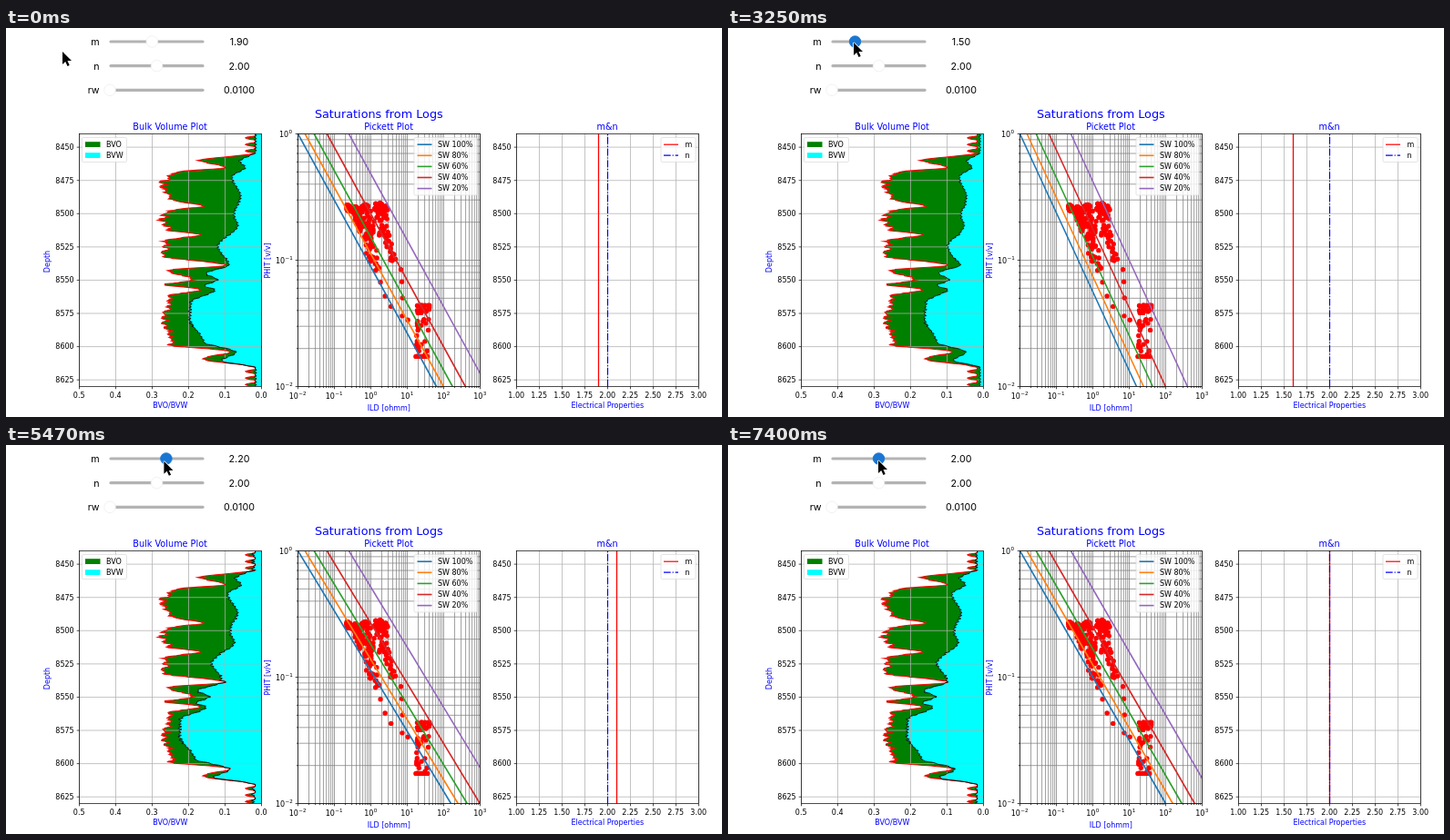
An HTML page with a canvas for the animation above (8000 ms loop, 786 px wide and 428 px high).

```html
<!DOCTYPE html>
<html lang="en">
<head>
<meta charset="utf-8">
<title>Saturations from Logs</title>
<style>
html, body { margin: 0; width: 100%; height: 100%; overflow: hidden; background: #fff; }
canvas { display: block; }
</style>
</head>
<body>
<canvas id="stage" width="786" height="428"></canvas>
<script>
const c = document.getElementById('stage').getContext('2d');
const LOOP = 8000, TICK = 147.6;
const TOP = 116.5, BOTTOM = 394.5, WIDE = 200;
const BULK = 80.5, PICKETT = 320.5, PROPS = 560.5;
const UI = 'Inter, "Open Sans", sans-serif', PLOT = '"DejaVu Sans", sans-serif';
const RW = 0.01, N = 2, M0 = 1.9;

// Cursor path: [tick, x, y]
const cursorPath = [[0, 62, 26], [2, 59, 25], [4, 59, 25], [6, 66, 30], [10, 158, 12.5], [13, 158, 12.5],
  [18, 141, 15.5], [20, 138, 16], [22, 138, 16], [23, 141, 16], [26, 150, 17], [32, 174.5, 18],
  [36, 174.5, 18], [41, 169, 17], [46, 169, 17], [47, 165, 17]];

// Key points down the well, [y, volume]: porosity of the sands, water volume at m = M0
const sand = [[137, 0.01], [146, 0.17], [153, 0.1], [160, 0.25], [172, 0.27], [188, 0.25], [196, 0.165],
  [202, 0.262], [210, 0.272], [222, 0.252], [228, 0.165], [233, 0.26], [251, 0.265], [261, 0.1],
  [267, 0.26], [277, 0.185], [282, 0.26], [288, 0.165], [294, 0.25], [321, 0.265], [349, 0.245],
  [356, 0.085], [364, 0.16], [374, 0.01]];
const water = [[136, 0.0165], [147, 0.06], [153, 0.045], [164, 0.081], [185, 0.058], [206, 0.076],
  [217, 0.065], [240, 0.12], [261, 0.09], [270, 0.153], [277, 0.122], [284, 0.156], [288, 0.128],
  [302, 0.195], [320, 0.197], [345, 0.16], [357, 0.07], [366, 0.11], [374, 0.0165]];

const linear = u => u, smooth = u => u * u * (3 - 2 * u);

function between(keys, t, i = 1, ease = linear) {
  const n = keys.findIndex(k => k[0] > t);
  if (n < 1) return keys[n ? keys.length - 1 : 0][i];
  const a = keys[n - 1], b = keys[n];
  return a[i] + (b[i] - a[i]) * ease((t - a[0]) / (b[0] - a[0]));
}

let seed = 7;
const rand = () => (seed = seed * 16807 % 2147483647) / 2147483647;

// One sample per half foot; resistivity follows from Archie's equation
const samples = [];
for (let y = TOP; y <= BOTTOM; y += 0.73) {
  const shale = Math.max(0.0173, 0.026 + 0.018 * Math.cos((y - 121) * 0.88));
  const ripple = 1 + 0.025 * Math.sin(y * 1.05) + 0.06 * (rand() - 0.5);
  const phi = Math.max(shale, between(sand, y, 1, smooth) * ripple);
  const w = between(water, y, 1, smooth) * (1 + 0.03 * (rand() - 0.5)) + 0.003 * Math.sin(y * 1.9);
  samples.push({ y, phi, rt: RW * phi ** (N - M0) / w ** N });
}

// The thumb snaps to tenths under the cursor once the drag has begun
function sliderAt(tick) {
  if (tick < 10) return 1.9;
  return Math.round(20 + (between(cursorPath, tick) + 1.3 - 165.5) / 5.2) / 10;
}

// Plots redraw one slider change at a time, with a delay and a least gap
const redraws = [{ at: 0, m: 1.9 }];
for (let tick = 1; tick * TICK < LOOP; tick++) {
  const last = redraws[redraws.length - 1], m = sliderAt(tick);
  if (m !== last.m) redraws.push({ at: Math.max(tick + 2.5, last.at + 2.2), m });
}

function text(s, x, y, { size = 8, color = '#000', align = 'center', font = PLOT, turn = 0 } = {}) {
  c.save();
  c.translate(x, y);
  c.rotate(turn);
  c.font = size + 'px ' + font;
  c.fillStyle = color;
  c.textAlign = align;
  c.fillText(s, 0, size * 0.36);
  c.restore();
}

function path(points, color, width = 1, fill) {
  c.beginPath();
  points.forEach(p => c.lineTo(p[0], p[1]));
  if (color) { c.strokeStyle = color; c.lineWidth = width; c.stroke(); }
  if (fill) { c.fillStyle = fill; c.fill(); }
}
const line = (x1, y1, x2, y2, color, width) => path([[x1, y1], [x2, y2]], color, width);

function dashed(x1, y1, x2, y2) {
  c.setLineDash([7.7, 1.9, 1.2, 1.9]);
  line(x1, y1, x2, y2, '#00f', 1.2);
  c.setLineDash([]);
}

function disc(x, y, r, fill, edge) {
  c.beginPath();
  c.arc(x, y, r, 0, 7);
  c.fillStyle = fill;
  c.fill();
  if (edge) { c.strokeStyle = edge; c.lineWidth = 0.8; c.stroke(); }
}

function box(x, y, w, h) {
  c.beginPath();
  c.roundRect(x, y, w, h, 1.6);
  c.fillStyle = 'rgba(255,255,255,.8)';
  c.fill();
  c.strokeStyle = '#d8d8d8';
  c.lineWidth = 0.7;
  c.stroke();
}

function clipped(x, draw) {
  c.save();
  c.beginPath();
  c.rect(x, TOP, WIDE, BOTTOM - TOP);
  c.clip();
  draw();
  c.restore();
}

function frame(x, title, label, labelY) {
  c.strokeStyle = '#000';
  c.lineWidth = 0.7;
  c.strokeRect(x, TOP, WIDE, BOTTOM - TOP);
  text(title, x + 99.6, 108.6, { size: 9.7, color: '#00f' });
  text(label, x + 99.8, labelY, { color: '#00f' });
}

function gridX(x, color, tick = 2.8) {
  line(x, TOP, x, BOTTOM, color, 0.75);
  line(x, BOTTOM, x, BOTTOM + tick, '#000', 0.7);
}

function gridY(x, y, color, tick = 2.8) {
  line(x, y, x + WIDE, y, color, 0.75);
  line(x - tick, y, x, y, '#000', 0.7);
}

function linearGrid(x, count, label) {
  for (let i = 0; i <= count; i++) {
    const gx = x + i * WIDE / count;
    gridX(gx, '#b0b0b0');
    text(label(i), gx - 0.3, 404);
  }
  for (let depth = 8450; depth <= 8625; depth += 25) {
    const y = TOP + (depth - 8440) * (BOTTOM - TOP) / 190;
    gridY(x, y, '#b0b0b0');
    text(depth, x - 5.8, y, { align: 'right' });
  }
}

function slider(name, y, x, value, active) {
  text(name, 102.6, y, { size: 10.7, align: 'right', font: UI });
  c.lineCap = 'round';
  line(115, y, 216, y, '#b3b3b3', 3.2);
  c.lineCap = 'butt';
  disc(x, y, 6.3, active ? '#1976d2' : '#fff', active ? '#1976d2' : '#eee');
  text(value, 256, y, { size: 10.7, font: UI });
}

function bulkPlot(m) {
  const right = BULK + WIDE;
  const phi = samples.map(s => [right - 400 * s.phi, s.y]);
  const bvw = samples.map(s => {
    const sw = Math.sqrt(RW / (s.phi ** m * s.rt));
    return [right - 400 * s.phi * Math.min(1, sw), s.y];
  });
  clipped(BULK, () => {
    path([...phi, ...bvw.slice().reverse()], null, 0, '#008000');
    path([...bvw, [right, BOTTOM], [right, TOP]], null, 0, '#0ff');
  });
  linearGrid(BULK, 5, i => ((5 - i) / 10).toFixed(1));
  clipped(BULK, () => {
    path(phi, '#f00', 1.1);
    path(bvw, '#000', 0.9);
  });
  frame(BULK, 'Bulk Volume Plot', 'BVO/BVW', 415.5);
  text('Depth', 45, 257, { color: '#00f', turn: -Math.PI / 2 });
  box(83.5, 120.5, 49, 27);
  [['BVO', '#008000'], ['BVW', '#0ff']].forEach(([s, color], i) => {
    c.fillStyle = color;
    c.fillRect(87, 125.2 + i * 12, 16.5, 5.8);
    text(s, 110, 128.2 + i * 12, { align: 'left' });
  });
}

function power(x, y, e) {
  text('10', x, y, { align: 'left' });
  text(String(e).replace('-', '\u2212'), x + 10.6, y - 3.4, { size: 5.6, align: 'left' });
}

function pickettPlot(m) {
  const px = v => PICKETT + (v + 2) * 40, py = v => TOP - v * 139;
  for (let e = -2; e <= 3; e++)
    for (let k = 1; k < 10; k++) {
      const v = e + Math.log10(k), tick = k > 1 ? 1.6 : 2.8;
      if (v <= 3) gridX(px(v), '#808080', tick);
      if (v <= 0) gridY(PICKETT, py(v), '#808080', tick);
      if (k > 1) continue;
      power(px(e) - (e < 0 ? 9.8 : 7.3), 405, e);
      if (e <= 0) power(e < 0 ? 296 : 300, py(e) + 1, e);
    }
  const lines = [[100, '#1f77b4'], [80, '#ff7f0e'], [60, '#2ca02c'], [40, '#d62728'], [20, '#9467bd']];
  clipped(PICKETT, () => {
    samples.forEach(s => disc(px(Math.log10(s.rt)), py(Math.log10(s.phi)), 2.7, '#f00'));
    for (const [sw, color] of lines) {
      const start = -2 - N * Math.log10(sw / 100);
      line(px(start), TOP, px(start + 2 * m), BOTTOM, color, 1.6);
    }
  });
  frame(PICKETT, 'Pickett Plot', 'ILD [ohmm]', 418);
  text('PHIT [v/v]', 287, 256, { color: '#00f', turn: -Math.PI / 2 });
  box(448, 120.5, 69, 63.5);
  lines.forEach(([sw, color], i) => {
    const y = 128.2 + i * 12.1;
    line(451.5, y, 467.5, y, color, 1.6);
    text('SW ' + sw + '%', 474, y, { align: 'left' });
  });
}

function propsPlot(m) {
  linearGrid(PROPS, 8, i => (1 + i / 4).toFixed(2));
  const x = PROPS + (m - 1) * 100;
  line(x, TOP, x, BOTTOM, '#f00', 1.3);
  dashed(PROPS + 100, BOTTOM, PROPS + 100, TOP);
  frame(PROPS, 'm&n', 'Electrical Properties', 415.5);
  box(719, 120.5, 38, 27);
  line(722, 128.2, 738, 128.2, '#f00', 1.2);
  dashed(722, 140.2, 738, 140.2);
  text('m', 745.5, 128.2, { align: 'left' });
  text('n', 745.5, 140.2, { align: 'left' });
}

function cursor(x, y) {
  const arrow = [[0, 0], [0, 14], [3.2, 11], [5.5, 16], [7.7, 15], [5.5, 10.1], [10, 10.1], [0, 0]];
  path(arrow.map(p => [x + p[0], y + p[1]]), '#fff', 1.6, '#000');
}

function draw(now) {
  const tick = Math.floor(now % LOOP / TICK);
  const value = sliderAt(tick), { m } = redraws.filter(r => r.at <= tick).pop();
  c.fillStyle = '#fff';
  c.fillRect(0, 0, 786, 428);
  slider('m', 15, 165.5 + (value - 2) * 52, value.toFixed(2), tick >= 2);
  slider('n', 41.7, 165.5, '2.00');
  slider('rw', 68.3, 114, '0.0100');
  text('Saturations from Logs', 409.3, 94.4, { size: 12.8, color: '#00f' });
  bulkPlot(m);
  pickettPlot(m);
  propsPlot(m);
  cursor(between(cursorPath, tick), between(cursorPath, tick, 2));
}

const began = performance.now();
function loop() {
  draw(performance.now() - began);
  requestAnimationFrame(loop);
}
loop();
</script>
</body>
</html>
```
